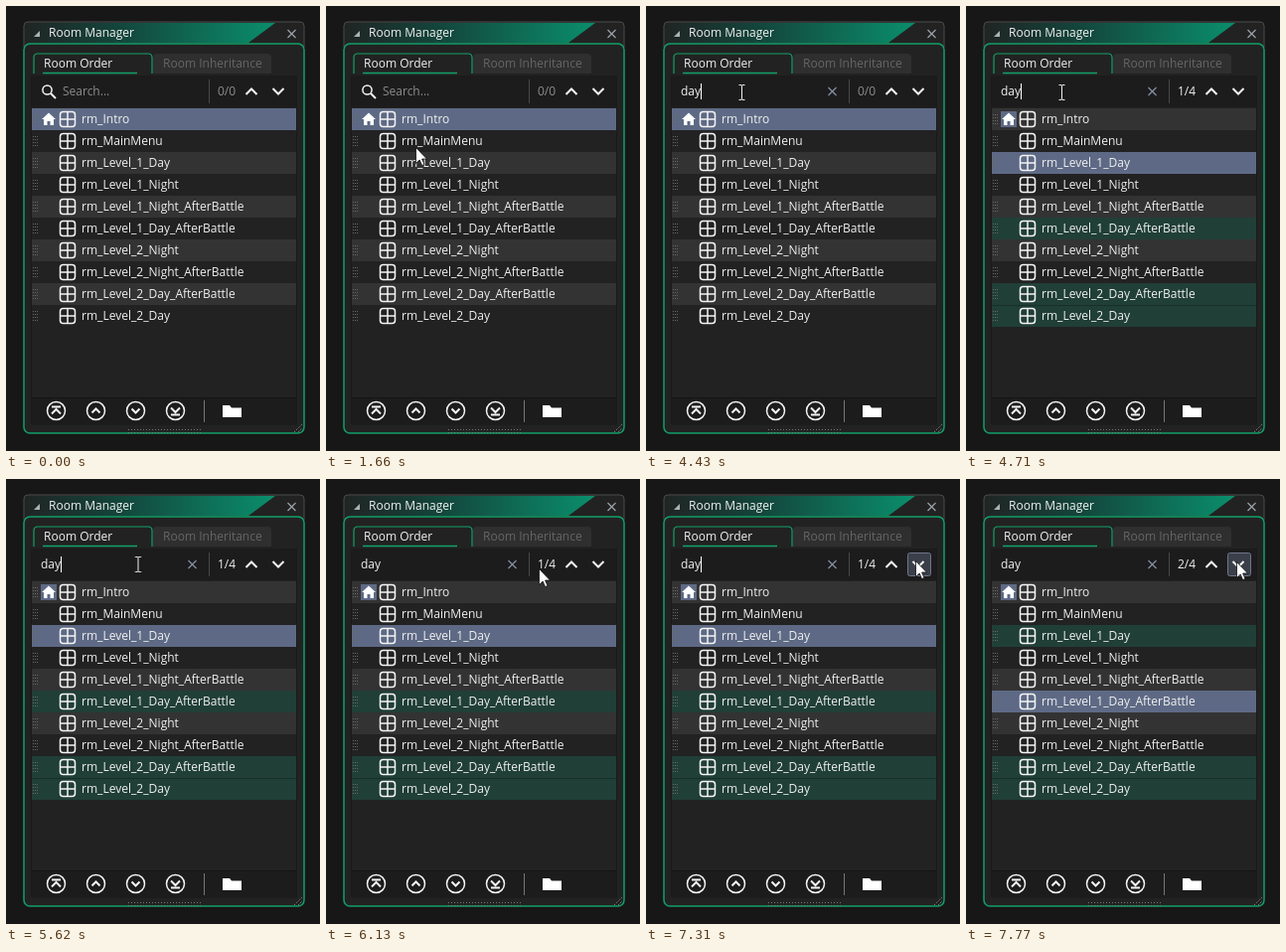
Write an HTML page that moves like this. It is 316x448 px and loops after 8 s.

```html
<!DOCTYPE html>
<html lang="en">
<head>
<meta charset="utf-8">
<title>Room Manager</title>
<style>
html, body { margin: 0; width: 100%; height: 100%; overflow: hidden; background: #171717; }
svg { display: block; width: 316px; height: 448px; }
text { font: 12px "Open Sans", "Noto Sans", sans-serif; fill: #f0f0f0; white-space: pre; }
.dim { fill: #8c8c8c; }
.off { fill: #666; }
.line { fill: none; stroke: #f4f4f4; stroke-width: 1.5; }
.thick { stroke-width: 2; }

/* Every animation shares one 8 s clock: percent = ms / 80 */
.t { animation: 8s step-end infinite; }
#hint { animation-name: hint; }
#lens { animation-name: lens; }
#clear, #d { animation-name: typedD; }
#a { animation-name: typedA; }
#y { animation-name: typedY; }
#caret { animation-name: caret; }
#n0 { animation-name: n0; }
#n1 { animation-name: n1; }
#n2 { animation-name: n2; }
#row0 { animation-name: row0; }
#row2 { animation-name: row2; }
#row5 { animation-name: row5; }
#row8, #row9 { animation-name: hit; }
#gap { animation-name: gap; }
#upHover { animation-name: upHover; }
#downHover { animation-name: downHover; }
#arrow { animation-name: arrow; }
#beam { animation-name: beam; }
#mouse { animation: move 8s infinite; }

@keyframes hint { 0% { visibility: visible } 29.875% { visibility: hidden } }
@keyframes lens { 0% { visibility: visible } 50.875% { visibility: hidden } }
@keyframes typedD { 0% { visibility: hidden } 50.875% { visibility: visible } }
@keyframes typedA { 0% { visibility: hidden } 53.125% { visibility: visible } }
@keyframes typedY { 0% { visibility: hidden } 55.375% { visibility: visible } }
@keyframes n0 { 0% { visibility: visible } 58.875% { visibility: hidden } }
@keyframes n1 { 0% { visibility: hidden } 58.875% { visibility: visible } 96% { visibility: hidden } }
@keyframes n2 { 0% { visibility: hidden } 96% { visibility: visible } }
@keyframes caret {
  0% { opacity: 0; transform: translateX(57px) }
  31%, 40.75% { opacity: 1; transform: translateX(57px) }
  34.5%, 46.625% { opacity: 0; transform: translateX(57px) }
  50.875% { opacity: 1; transform: translateX(42px) }
  53.125% { opacity: 1; transform: translateX(49px) }
  55.375%, 66.875%, 78.875%, 91.375% { opacity: 1; transform: translateX(55px) }
  61.125%, 73.375%, 85.75%, 97.125%, 100% { opacity: 0; transform: translateX(55px) }
}
@keyframes row0 { 0% { fill: #5e6a85 } 58.875% { fill: #333 } }
@keyframes row2 { 0% { fill: #333 } 58.875% { fill: #5e6a85 } 96% { fill: #203f37 } }
@keyframes row5 { 0% { fill: #222 } 58.875% { fill: #203f37 } 96% { fill: #5e6a85 } }
@keyframes hit { 58.875%, 100% { fill: #203f37 } }
@keyframes gap { 0% { visibility: hidden } 58.875% { visibility: visible } }
@keyframes upHover { 0% { visibility: hidden } 85.75% { visibility: visible } 89.125% { visibility: hidden } }
@keyframes downHover {
  0% { visibility: hidden; fill: #3b3f4a }
  89.125% { visibility: visible; fill: #3b3f4a }
  94.875% { visibility: visible; fill: #2a2d35 }
  96% { visibility: visible; fill: #3b3f4a }
}
@keyframes arrow {
  0% { visibility: hidden }
  15.625% { visibility: visible }
  25.25% { visibility: hidden }
  72.2% { visibility: visible }
}
@keyframes beam { 0% { visibility: hidden } 25.25% { visibility: visible } 72.2% { visibility: hidden } }
@keyframes move {
  0% { transform: translate(161px, 378px); animation-timing-function: step-end }
  15.625% { transform: translate(161px, 378px); animation-timing-function: steps(2) }
  17.675% { transform: translate(126px, 264px); animation-timing-function: steps(3) }
  20.75% { transform: translate(90px, 142px); animation-timing-function: steps(4) }
  25.25% { transform: translate(96px, 89px); animation-timing-function: step-end }
  26.375% { transform: translate(96px, 87px); animation-timing-function: step-end }
  65.79% { transform: translate(96px, 87px); animation-timing-function: steps(3) }
  69.04% { transform: translate(115px, 86px); animation-timing-function: steps(4) }
  73.375% { transform: translate(185px, 86px); animation-timing-function: steps(3) }
  76.625% { transform: translate(214px, 90px); animation-timing-function: steps(2) }
  78.875% { transform: translate(217px, 89px); animation-timing-function: step-end }
  81.25% { transform: translate(217px, 89px); animation-timing-function: steps(3) }
  84.625% { transform: translate(229px, 88px); animation-timing-function: steps(4) }
  89.125% { transform: translate(265px, 84px); animation-timing-function: steps(2) }
  91.375% { transform: translate(271px, 82px); animation-timing-function: step-end }
  94.875%, 100% { transform: translate(272px, 83px); animation-timing-function: step-end }
}
</style>
</head>
<body>
<svg viewBox="0 0 316 448">
  <defs>
    <linearGradient id="bar">
      <stop offset="0" stop-color="#202524"/>
      <stop offset=".35" stop-color="#14433a"/>
      <stop offset="1" stop-color="#0a8e6b"/>
    </linearGradient>
    <pattern id="dots" width="3" height="3" patternUnits="userSpaceOnUse">
      <rect width="1" height="1" fill="#777"/>
    </pattern>
  </defs>

  <!-- Window -->
  <path d="M18 42V20q0-4 4-4H296q4 0 4 4V42Z" fill="#222" stroke="#4a4d4c"/>
  <path d="M19 37V20q0-3 3-3H271L244 37Z" fill="url(#bar)"/>
  <rect x="18" y="38" width="282" height="392" rx="6" fill="#222" stroke="#12a068" stroke-width="1.5"/>
  <path d="M34 25V31H28Z" fill="#a9b3b0"/>
  <text x="43" y="31">Room Manager</text>
  <path class="line" d="M283.500 24l8 8m0-8l-8 8" style="stroke:#9aa3ad;stroke-width:1.2"/>

  <!-- Tabs -->
  <path d="M148 68V52q0-4 4-4H263q4 0 4 4V68Z" fill="#2f2f2f"/>
  <path d="M28 68V52q0-4 4-4H143q4 0 4 4V68" fill="#222" stroke="#12a068" stroke-width="1.2"/>
  <path d="M37 67.500H132" stroke="#12a068" stroke-width="1.5"/>
  <text x="38" y="62">Room Order</text>
  <text x="158" y="62" class="off">Room Inheritance</text>

  <!-- Search -->
  <rect x="26" y="70" width="266" height="32" fill="#1c1c1c"/>
  <g id="lens" class="t">
    <circle class="line" cx="41.500" cy="84.500" r="4.600"/>
    <path class="line thick" d="M45 88l5 5"/>
  </g>
  <text id="hint" class="dim t" x="57" y="90">Search...</text>
  <text x="35" y="90"><tspan id="d" class="t">d</tspan><tspan id="a" class="t">a</tspan><tspan id="y" class="t">y</tspan></text>
  <rect id="caret" class="t" y="78" width="1" height="16" fill="#fff"/>
  <path id="clear" class="line t" d="M183.500 82l8 8m0-8l-8 8" style="stroke:#8791a5;stroke-width:1.2"/>
  <path d="M204.500 74V98" stroke="#484848"/>
  <text id="n0" class="dim t" x="213" y="90">0/0</text>
  <text id="n1" class="t" x="213" y="90">1/4</text>
  <text id="n2" class="t" x="213" y="90">2/4</text>
  <rect id="upHover" class="t" x="235.500" y="74.500" width="23" height="23" rx="2" fill="#3b3f4a" stroke="#6d768b"/>
  <rect id="downHover" class="t" x="263.500" y="74.500" width="23" height="23" rx="2" stroke="#6d768b"/>
  <path class="line thick" d="M241.500 89l5.500-5.500 5.500 5.500M268.500 83l5.500 5.500 5.500-5.500"/>

  <!-- List -->
  <g id="rows"></g>
  <path id="gap" class="t" d="M26 301.500H292" stroke="#182f29"/>
  <path d="M292.500 70V421M25.500 70V421" stroke="#1a1a1a"/>
  <path d="M43 107.500l7 6.500h-2v6h-3.500v-4h-3v4H38v-6h-2z" fill="#fff"/>

  <!-- Toolbar -->
  <rect x="26" y="394" width="266" height="28" fill="#1c1c1c"/>
  <path d="M26 394.500H292" stroke="#151515"/>
  <g id="tools"></g>
  <path d="M199.500 397V419" stroke="#777"/>
  <path d="M218 402h7l2 2.500h10V414H218Z" fill="#fff"/>
  <rect x="121" y="426" width="76" height="4" fill="url(#dots)"/>
  <path d="M290 429l8-8M294 429l4-4" stroke="#777" stroke-dasharray="1.500 1"/>

  <!-- Pointer -->
  <g id="mouse">
    <path id="arrow" class="t" d="M.5 .5V16.500l3.700-3.500 2.400 5.500 2.400-1-2.400-5.500H11.500Z" fill="#fff" stroke="#111" stroke-width=".8"/>
    <path id="beam" class="t" d="M-2.500-7.500H0l.5.500.500-.500H3.500M.5-7V7M-2.500 7.500H0l.5-.500.500.500H3.500" fill="none" stroke="#eee"/>
  </g>
</svg>
<script>
const rooms = ["Intro", "MainMenu", "Level_1_Day", "Level_1_Night", "Level_1_Night_AfterBattle",
  "Level_1_Day_AfterBattle", "Level_2_Night", "Level_2_Night_AfterBattle",
  "Level_2_Day_AfterBattle", "Level_2_Day"];

const row = (name, i) => {
  const y = 103 + 22 * i;
  const home = i ? "" : `<rect x="35" y="${y + 3}" width="16" height="16" fill="#5e6a85"/>`;
  return `<rect id="row${i}" class="t" x="26" y="${y}" width="266" height="22" fill="${i % 2 ? "#222" : "#333"}"/>
    <path d="M27 ${y + 6.5}h5m-5 3h5m-5 3h5m-5 3h5" stroke="#666" stroke-dasharray="1 1"/>${home}
    <rect class="line" x="54.500" y="${y + 3.5}" width="15" height="15" rx="3"/>
    <path class="line" d="M62 ${y + 4}v14M55 ${y + 11}h14"/>
    <text x="76" y="${y + 15}">rm_${name}</text>`;
};

const marks = ["M-4.500-4h9M-4.500 3L0-1.500 4.500 3", "M-4 2L0-2 4 2",
  "M-4-2L0 2 4-2", "M-4.500 4h9M-4.500-3L0 1.500 4.500-3"];
const tool = (d, i) => `<g class="line" transform="translate(${50.5 + 40 * i} 407.500)">
  <circle r="9" class="line"/><path class="line thick" d="${d}"/></g>`;

document.getElementById("rows").innerHTML = rooms.map(row).join("");
document.getElementById("tools").innerHTML = marks.map(tool).join("");
</script>
</body>
</html>
```
